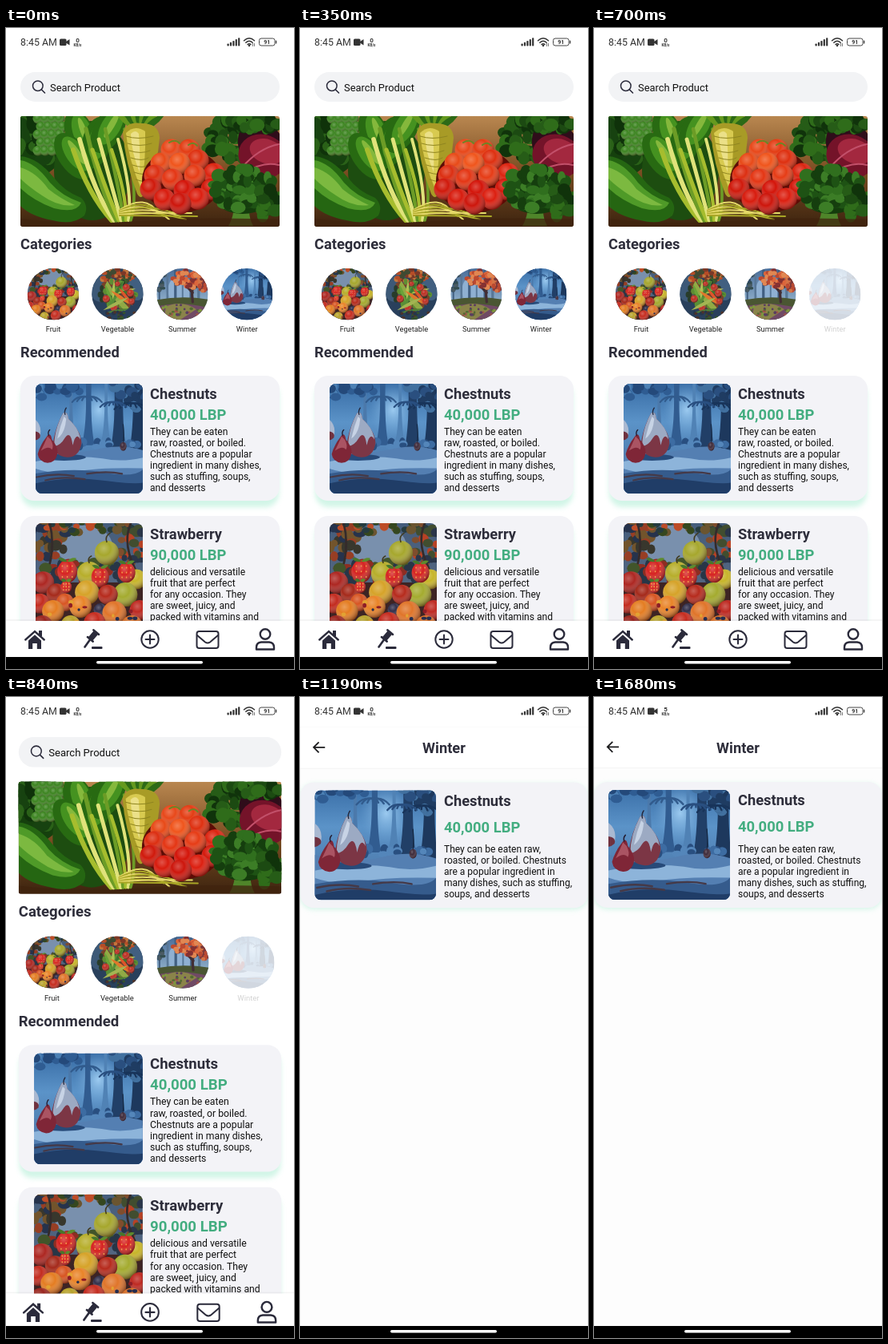
Animation of 360x800 px, one loop 1.75 s. Source, as an HTML page:

```html
<!DOCTYPE html>
<html lang="en">
<head>
<meta charset="utf-8">
<title>Grocery shop</title>
<style>
html, body { margin: 0; width: 100%; height: 100%; overflow: hidden; background: #fff; }
svg { display: block; width: 360px; height: 800px; font-family: Roboto, sans-serif; }
.head { font-size: 18.3px; font-weight: 700; fill: #2d2d3a; }
.price { font-size: 18.4px; font-weight: 700; fill: #43ad80; }
.body { font-size: 12.05px; fill: #111; }
.label { font-size: 9.3px; fill: #222; text-anchor: middle; }
.line { fill: none; stroke: #2b2b3b; stroke-width: 2; stroke-linecap: round; stroke-linejoin: round; }
</style>
</head>
<body>
<svg id="stage" viewBox="0 0 360 800"></svg>
<script>
const LOOP = 1750, STEP = 70;
const TAP = 590, OPEN = 767, OPEN_LEN = 583;
const INK = '#2b2b3b';

// ---- drawing helpers ----
let seed = 7;
const rnd = () => (seed = (seed * 16807) % 2147483647) / 2147483647;
const each = (list, fn) => list.map(fn).join('');
const times = (n, fn) => Array.from({ length: n }, (_, i) => fn(i)).join('');
const rect = (x, y, w, h, fill, r = 0, more = '') =>
  `<rect x="${x}" y="${y}" width="${w}" height="${h}" rx="${r}" fill="${fill}" ${more}/>`;
const oval = (x, y, rx, ry, fill, rot = 0) =>
  `<ellipse cx="${x}" cy="${y}" rx="${rx}" ry="${ry}" fill="${fill}" transform="rotate(${rot} ${x} ${y})"/>`;
const shape = (d, fill, more = '') => `<path d="${d}" fill="${fill}" ${more}/>`;
const stroke = (d, color, w, more = '') =>
  `<path d="${d}" fill="none" stroke="${color}" stroke-width="${w}" stroke-linecap="round" ${more}/>`;
const ball = (x, y, r, fill, ry = r, rot = 0) =>
  oval(x, y, r, ry, fill, rot) + oval(x, y, r, ry, 'url(#shade)', rot);
const text = (x, y, cls, s, more = '') => `<text x="${x}" y="${y}" class="${cls}" ${more}>${s}</text>`;
const lines = (x, y, list) => each(list, (s, i) => text(x, y + i * 14, 'body', s));
const leaf = (x, y, len, wide, rot, fill) =>
  shape(`M0 0Q${len / 2} ${-wide} ${len} 0Q${len / 2} ${wide} 0 0`, fill,
    `transform="translate(${x} ${y}) rotate(${rot})"`);
const cluster = (x, y, rx, ry, n, r, colors) => times(n, i => {
  const a = rnd() * 6.283, d = Math.sqrt(rnd());
  return oval(x + Math.cos(a) * d * rx, y + Math.sin(a) * d * ry,
    r * (0.6 + rnd() * 0.6), r * (0.6 + rnd() * 0.5), colors[i % colors.length]);
});
const gradient = (id, stops) =>
  `<linearGradient id="${id}" x2="0" y2="1">${each(stops, ([o, c]) => `<stop offset="${o}" stop-color="${c}"/>`)}</linearGradient>`;
const symbol = (id, art) =>
  `<symbol id="${id}" viewBox="0 0 100 100" preserveAspectRatio="xMidYMid slice">${art}</symbol>`;
let clips = 0;
const clipped = (x, y, w, h, r, art) => {
  const id = 'clip' + clips++;
  return `<clipPath id="${id}">${rect(x, y, w, h, '#000', r)}</clipPath><g clip-path="url(#${id})">${art}</g>`;
};
const pic = (id, x, y, w, h, r) =>
  clipped(x, y, w, h, r, `<use href="#${id}" x="${x}" y="${y}" width="${w}" height="${h}"/>`);

// ---- pictures ----
function winterArt() {
  const trunk = (x, w, c, base) =>
    shape(`M${x} 0L${x + w} 0Q${x + w - 1} 40 ${x + w + 3} ${base}L${x - 4} ${base}Q${x + 1} 40 ${x} 0`, c);
  const frond = (x, y, s, c) => times(7, i =>
    stroke(`M${x} ${y}q${(i - 3) * s * 0.6} ${-s * 0.4} ${(i - 3) * s} ${s * (0.5 + Math.abs(i - 3) * 0.18)}`, c, 1.6));
  return rect(0, 0, 100, 100, 'url(#wintersky)') + oval(59, 24, 22, 26, 'url(#glow)') +
    trunk(32, 3, '#4b79ab', 56) + trunk(47, 5, '#315c90', 56) + trunk(64, 3, '#5082b5', 57) +
    trunk(73, 8, '#213f67', 62) + trunk(90, 9, '#1d385d', 65) +
    cluster(16, 7, 26, 8, 26, 5, ['#2f5c92', '#24497a', '#4c80b4']) +
    cluster(86, 8, 19, 15, 30, 5, ['#1f3c62', '#2a4f7f', '#41709f']) +
    frond(48, 12, 4.5, '#315b8d') + frond(88, 18, 5, '#18345a') + frond(72, 17, 4, '#294f80') +
    cluster(50, 56, 50, 3, 26, 4, ['#3d6ca2', '#5486ba', '#294f80']) +
    shape('M0 58Q30 66 55 60T100 61V100H0Z', '#547fb2') +
    shape('M0 71Q34 64 62 68Q80 72 100 67V77Q60 76 38 80Q16 83 0 77Z', '#8db4da') +
    shape('M0 82Q35 76 64 81T100 77V100H0Z', '#355b8c') +
    shape('M0 91Q30 84 61 88T100 90V100H0Z', '#203d67') +
    stroke('M2 85Q20 81 36 84M10 88Q26 84 46 87M48 82Q66 79 80 82', '#453947', 1.6) +
    stroke('M81 37Q82 47 81 54', '#14263f', 0.8) + ball(81, 57, 3, '#3d2939', 4) +
    shape('M-3 30Q8 36 5 48Q2 52 -3 52Z', '#aab9d1') + shape('M-3 43Q7 43 5 49Q2 52 -3 52Z', '#70313f') +
    oval(27, 67, 20, 3, '#274a79') +
    shape('M26 27Q30 24 31 32Q43 44 43 54Q41 67 30 67Q18 66 17 54Q19 40 26 27Z', '#7c3645') +
    shape('M26 27Q30 24 31 32Q41 41 42 51Q38 43 35 56Q33 42 28 49Q24 56 18 57Q18 42 26 27Z', '#9caac3') +
    shape('M27 30Q23 40 21 50Q28 45 29 32Z', '#c7d3e5') +
    stroke('M28 28Q27 25 29 22', '#24283d', 1) +
    shape('M12 47Q15 44 16 51Q22 58 21 64Q19 72 12 72Q4 71 3 64Q5 56 12 47Z', '#7f2637') +
    shape('M12 48Q9 55 6 61Q13 56 16 60Q18 57 15 51Z', '#aa5463') +
    stroke('M13 47Q12 44 14 42', '#241d31', 1);
}

function fruitArt() {
  const berry = (x, y, r) => ball(x, y, r, '#d62320', r * 1.15) +
    times(9, i => oval(x + ((i % 3) - 1) * r * 0.5, y + (Math.floor(i / 3) - 1) * r * 0.55, 0.6, 0.8, '#f2a04b')) +
    leaf(x, y - r, r, 3, 200, '#47772a') + leaf(x, y - r, r, 3, -20, '#5d8b2d');
  const fruits = [[8, 54, 10, '#ad2722'], [93, 51, 9, '#c7b52a'], [66, 27, 11, '#a6a72d'], [50, 46, 11, '#b7ae2b'],
    [20, 64, 9, '#a52a1b'], [48, 63, 11, '#d6a329'], [83, 65, 11, '#a4ab2f'], [67, 65, 9, '#b62b1d'],
    [5, 73, 9, '#c32c20'], [28, 72, 8, '#d75522'], [17, 80, 10, '#e47d22'], [42, 76, 10, '#e98428'],
    [96, 79, 9, '#be2a22'], [60, 79, 6, '#32304b'], [73, 82, 11, '#e0752a'], [55, 91, 10, '#c62d20'],
    [33, 93, 9, '#b9a42d'], [89, 94, 10, '#d9712a'], [7, 94, 10, '#9b2720']];
  return rect(0, 0, 100, 100, 'url(#fruitsky)') +
    oval(45, 20, 26, 18, '#7990ad') +
    cluster(12, 18, 19, 26, 38, 5, ['#38372d', '#26334c', '#72542c', '#973e24']) +
    cluster(55, 4, 46, 6, 30, 4, ['#263b3f', '#6b5530', '#bd4c27', '#35471f']) +
    cluster(90, 21, 12, 24, 30, 4, ['#2a3549', '#7f4d2d', '#b84225', '#414d2f']) +
    stroke('M14 0Q20 24 10 50M88 0Q80 18 92 42', '#342b2b', 2) +
    rect(0, 54, 100, 46, '#3d2424') +
    cluster(50, 44, 45, 10, 40, 5, ['#41552a', '#8e2d22', '#283647']) +
    each(fruits.slice(0, 4), f => ball(...f)) +
    berry(30, 44, 9) + berry(60, 49, 8) + berry(84, 45, 8) +
    each(fruits.slice(4), f => ball(...f)) + berry(29, 58, 5) +
    cluster(50, 84, 47, 13, 12, 2, ['#262e4f', '#e2a332', '#8e1d26']) +
    stroke('M66 17Q64 12 69 9M50 36Q48 32 52 30', '#413b20', 1.2);
}

function vegArt() {
  return rect(0, 0, 100, 100, '#29405c') + oval(18, 35, 24, 30, '#3d5977') + oval(88, 30, 18, 32, '#415f80') +
    cluster(52, 14, 36, 14, 48, 5, ['#7c3827', '#b64d27', '#3f4a32', '#c2763d']) +
    cluster(50, 50, 34, 27, 60, 6, ['#38612b', '#5e8e33', '#283c2a', '#784129']) +
    shape('M30 24Q42 45 72 76L64 82Q37 55 25 35Z', '#91aa45') +
    shape('M63 25Q55 45 38 75L31 70Q42 45 54 22Z', '#588f38') +
    times(6, i => leaf(38 + i * 3, 64 - i * 4, 36, 6, -110 + i * 24, ['#6aa339', '#b0bf54', '#3d7530'][i % 3])) +
    leaf(37, 43, 48, 7, 35, '#e0772c') + leaf(52, 37, 45, 6, 52, '#df552a') +
    each([[67, 37, 7], [75, 48, 7], [28, 59, 7], [50, 30, 5], [77, 64, 6], [43, 76, 7]], ([x, y, r]) => ball(x, y, r, '#bd2e21')) +
    leaf(22, 81, 55, 7, -27, '#a3b552') + leaf(28, 86, 45, 5, -10, '#4f8136') +
    cluster(51, 91, 43, 8, 25, 4, ['#25364b', '#4c332b', '#35532d']);
}

function summerArt() {
  return rect(0, 0, 100, 100, 'url(#summersky)') + oval(46, 42, 24, 28, '#8fb0d2') +
    times(6, i => rect(4 + i * 15, 0, 3 + i % 3, 65, i % 2 ? '#587797' : '#415f82')) +
    shape('M0 61Q50 52 100 60V100H0Z', '#4a5632') + shape('M0 74Q45 62 100 76V100H0Z', '#704a65') +
    shape('M18 74Q48 60 77 79L45 100H15Z', '#8a844a') +
    stroke('M70 65Q66 38 76 13M70 47Q59 35 49 25M71 40Q81 33 90 27', '#422e34', 5) +
    cluster(65, 20, 33, 17, 72, 5, ['#bb4930', '#dc663b', '#853232', '#e18752']) +
    cluster(90, 32, 9, 13, 20, 5, ['#ba4a32', '#79383b', '#d47446']) +
    cluster(7, 19, 10, 26, 20, 5, ['#2f4961', '#4a5b64', '#344d50']) +
    cluster(50, 82, 43, 12, 30, 3, ['#516b32', '#9e5149', '#7e963d', '#5a3e60']);
}

function bannerArt() {
  const greens = ['#1c4a12', '#2f6c1a', '#10330b', '#265c17'];
  const reds = [[207, 152, '#e8481a'], [229, 152, '#e33d14'], [194, 169, '#e84a18'], [240, 165, '#de3010'],
    [217, 169, '#f0551c'], [260, 182, '#dc2410'], [186, 184, '#dc2f12'], [236, 184, '#e63c16'],
    [181, 201, '#d01a0c'], [208, 189, '#e43614'], [223, 203, '#d4150a'], [257, 201, '#d4190c'],
    [198, 214, '#d81c0e'], [240, 213, '#dc1f10'], [218, 219, '#cd160c']];
  return rect(18, 110, 324, 138, 'url(#wood)') +
    oval(40, 140, 34, 44, '#15400d') + oval(108, 178, 48, 62, '#1d4d10') +
    cluster(38, 136, 30, 34, 42, 10, ['#174210', '#2a6118', '#0f320a']) +
    times(20, i => ball(40 + (i % 4) * 9 + (i >> 2) % 2 * 4, 113 + (i >> 2) * 10, 6.5, '#3c8420')) +
    each([[93, 134, -20], [113, 143, 14], [128, 126, 30], [84, 160, -35]], ([x, y, r]) =>
      oval(x, y, 18, 33, '#286a12', r) + oval(x + 3, y - 3, 12, 25, '#459220', r) +
      oval(x + 4, y - 5, 4, 18, '#85b83c', r)) +
    times(9, i => stroke(`M${132 + i * 3} 240Q${103 + i * 8} 208 ${84 + i * 8} ${152 - i % 3 * 13}`,
      ['#a6bd2e', '#e0e37a', '#6c9c26'][i % 3], 6 - i * 0.3)) +
    times(8, i => leaf(168, 130, 40, 8, -142 + i * 15, i % 2 ? '#2d6a17' : '#65991f')) +
    shape('M146 130Q151 116 170 119Q191 119 192 137Q190 170 174 205Q169 216 164 207Q149 169 146 130Z', '#a89b26') +
    shape('M150 131Q161 120 174 129Q175 165 169 201Q153 164 150 131Z', '#d8ca50') +
    shape('M156 132Q162 126 166 132Q168 160 167 180Q157 156 156 132Z', '#ebe088') +
    times(7, i => stroke(`M${150 + i * 2} ${135 + i * 9}q15 5 ${34 - i * 4} 0`, '#8f8520', 1)) +
    times(8, i => stroke(`M142 ${227 + i}Q175 ${206 + i * 4} ${190 + i * 7} ${231 + i % 3 * 4}`, i % 2 ? '#a9a626' : '#e4d868', 2)) +
    shape('M18 160Q40 162 60 187Q73 204 94 212Q104 222 98 234Q83 247 58 240Q31 235 18 222Z', '#256612') +
    shape('M18 165Q37 168 55 193Q70 210 94 218Q88 232 60 225Q35 216 18 200Z', '#4f9a28') +
    shape('M18 174Q38 180 53 201Q68 213 86 221Q66 224 45 209Q28 198 18 188Z', '#7cb940') +
    cluster(282, 137, 32, 27, 62, 9, greens) +
    oval(320, 150, 28, 38, '#2f0d1a', -25) + oval(321, 160, 31, 27, '#741329', 20) +
    oval(326, 154, 22, 15, '#a3283f', 20) + stroke('M295 174Q316 150 341 145M299 181Q320 166 341 171', '#c2506a', 2) +
    cluster(316, 119, 26, 10, 28, 9, greens) +
    oval(220, 190, 50, 40, '#5c0c06') + each(reds, ([x, y, c]) => ball(x, y, 13.5, c)) +
    stroke('M204 143q8 -5 13 1M228 146q6 -5 11 1', '#6c8526', 2) +
    shape('M283 209Q288 230 278 247H309Q299 229 309 206Z', '#4f852a') +
    oval(296, 206, 38, 26, '#143c0c') +
    cluster(295, 200, 38, 25, 90, 8, ['#1e5214', '#306f1e', '#153e0e', '#3c7d26']) +
    cluster(328, 218, 17, 18, 25, 8, greens) +
    shape('M18 238Q90 247 170 241T342 239V248H18Z', '#40230e', 'opacity=".75"');
}

// ---- screens ----
const card = (x, y, w, h) =>
  rect(x + 1, y + 8, w - 2, h, '#b9f0da', 17, 'filter="url(#soft)" opacity=".65"') + rect(x, y, w, h, '#f3f3f7', 17);

function tabBar() {
  const bold = 'style="stroke-width:2.4"';
  return rect(0, 738, 360, 2, '#000', 0, 'opacity=".04"') + rect(0, 740, 360, 46, '#fff') +
    stroke('M24.300 763.500L36 753L47.700 763.500', INK, 2.4) + rect(41, 752, 4, 7, INK) +
    shape('M28 764.500L36 757.300L44 764.500V775H38.800V768H33.200V775H28Z', INK) +
    `<g transform="translate(109 758.5) rotate(40)">${rect(-3.5, -5, 7, 10, INK)}${rect(-5.500, -7, 11, 2.6, INK, 1)}${rect(-5.500, 4.400, 11, 2.6, INK, 1)}</g>` +
    stroke('M106 762L98.500 772.500', INK, 2.6) + rect(107, 772, 13.5, 3, INK, 1) +
    '<circle cx="180" cy="763" r="10.7" class="line"/><path d="M174.5 763h11M180 757.5v11" class="line"/>' +
    '<rect x="238.5" y="753" width="27" height="21" rx="3" class="line"/><path d="M239 758L249 766.5Q252 768.5 255 766.5L265 758" class="line"/>' +
    `<circle cx="324" cy="756.5" r="6.3" class="line" ${bold}/>` +
    `<path d="M319 766.5H329Q335 767 335 773V775.5H313V773Q313 767 319 766.5Z" class="line" ${bold}/>`;
}

function home() {
  const cat = (id, name, x) => `<g id="cat-${id}">${pic(id, x - 32.3, 300, 64.5, 64.5, 32.25)}${text(x, 379, 'label', name)}</g>`;
  return rect(0, 37, 360, 749, '#fff') + rect(18, 55, 324, 37, '#f2f3f5', 18.5) +
    '<circle cx="39.8" cy="72.2" r="6.3" class="line" style="stroke-width:1.5"/><path d="M44.5 77L48.5 81" class="line" style="stroke-width:1.6"/>' +
    text(55, 78.5, 'body', 'Search Product', 'style="font-size:12.9px"') +
    clipped(18, 110, 324, 138, 3, bannerArt()) +
    text(18, 276.3, 'head', 'Categories') +
    cat('fruit', 'Fruit', 59) + cat('veg', 'Vegetable', 139.5) + cat('summer', 'Summer', 220.5) + cat('winter', 'Winter', 301.2) +
    text(18, 411, 'head', 'Recommended') +
    card(18, 434, 324, 156) + pic('winter', 37, 444, 134, 137, 8) +
    text(180, 463.3, 'head', 'Chestnuts') + text(180, 489.3, 'price', '40,000 LBP') +
    lines(180, 508, ['They can be eaten', 'raw, roasted, or boiled.', 'Chestnuts are a popular', 'ingredient in many dishes,', 'such as stuffing, soups,', 'and desserts']) +
    card(18, 609, 324, 156) + pic('fruit', 37, 618, 134, 137, 8) +
    text(180, 637.7, 'head', 'Strawberry') + text(180, 663.5, 'price', '90,000 LBP') +
    lines(180, 682.5, ['delicious and versatile', 'fruit that are perfect', 'for any occasion. They', 'are sweet, juicy, and', 'packed with vitamins and']) +
    tabBar();
}

function detail() {
  return rect(0, 37, 360, 749, '#fdfdfd') + rect(0, 88, 360, 1.2, '#f4f4f4') + rect(0, 37, 360, 51, '#fff') +
    '<path d="M31 62.3H17.5M23.300 55.800L16.800 62.300L23.300 68.800" class="line" style="stroke:#1c1c1e;stroke-width:1.8;stroke-linecap:butt;stroke-linejoin:miter"/>' +
    text(180, 69.7, 'head', 'Winter', 'text-anchor="middle"') +
    rect(0, 108, 360, 157, '#b9f0da', 17, 'filter="url(#soft)" opacity=".6"') + rect(0, 106, 360, 157, '#f3f3f7', 17) +
    pic('winter', 18, 116, 152, 137, 8) +
    text(180, 135.3, 'head', 'Chestnuts') + text(180, 168.3, 'price', '40,000 LBP') +
    lines(180, 194, ['They can be eaten raw,', 'roasted, or boiled. Chestnuts', 'are a popular ingredient in', 'many dishes, such as stuffing,', 'soups, and desserts']);
}

function systemBars() {
  const small = (x, y, size, id, s) =>
    `<text id="${id}" x="${x}" y="${y}" font-size="${size}" font-weight="700" text-anchor="middle" fill="#333">${s}</text>`;
  return rect(0, 0, 360, 37, '#fff') + text(18, 22.3, 'body', '8:45 AM', 'style="font-size:12.4px;fill:#333"') +
    rect(67, 13.5, 8.5, 8.5, '#333', 1.5) + shape('M75 17L79.5 14V21.5L75 18.5Z', '#333') +
    small(89.5, 17.8, 8, 'rate', '0') + small(89.5, 23, 4.6, 'unit', 'KB/s') +
    times(5, i => rect(276.5 + i * 3.4, 19.5 - i * 1.8, 2.2, 3 + i * 1.8, '#333', 0.8)) +
    stroke('M297.5 15.8Q304 9.8 310.5 15.8M299.8 18.3Q304 14.3 308.2 18.3M302 20.6Q304 18.8 306 20.6', '#333', 1.5) +
    '<circle cx="304" cy="22" r="1.2" fill="#333"/>' + stroke('M308.5 22.5V19.5M310.5 19.5V22.5', '#555', 0.8) +
    rect(316.5, 13, 19.5, 9, 'none', 2.5, 'stroke="#444" stroke-width="1"') + rect(337, 15.5, 1.3, 4, '#444', 0.6) +
    small(326.2, 20.2, 7, 'charge', '91') +
    rect(0, 785, 360, 15, '#000') + rect(113, 790, 133, 3.4, '#fff', 1.7);
}

const stage = document.getElementById('stage');
stage.innerHTML = `<defs>
  <radialGradient id="shade" cx=".38" cy=".32" r=".72"><stop offset="0" stop-color="#fff" stop-opacity=".25"/>
    <stop offset=".4" stop-color="#fff" stop-opacity="0"/><stop offset="1" stop-color="#200" stop-opacity=".55"/></radialGradient>
  <radialGradient id="glow"><stop offset="0" stop-color="#9bcaf0"/><stop offset="1" stop-color="#6ea4d5" stop-opacity="0"/></radialGradient>
  ${gradient('wintersky', [[0, '#376ba4'], [0.35, '#5b93c8'], [0.6, '#5283b6']])}
  ${gradient('fruitsky', [[0, '#455d7c'], [0.5, '#526580']])}
  ${gradient('summersky', [[0, '#486c99'], [0.6, '#88a8c5']])}
  ${gradient('wood', [[0, '#b98750'], [0.5, '#7a4d22'], [1, '#3c230f']])}
  <filter id="soft" x="-10%" y="-20%" width="120%" height="140%"><feGaussianBlur stdDeviation="3"/></filter>
  ${symbol('winter', winterArt())}${symbol('fruit', fruitArt())}${symbol('veg', vegArt())}${symbol('summer', summerArt())}
  </defs>
  ${rect(0, 0, 360, 800, '#f2f2f2')}
  ${clipped(0, 37, 360, 748, 0, `<g id="home">${home()}</g><g id="detail">${detail()}</g>`)}
  ${systemBars()}`;

// ---- motion ----
const clamp = v => Math.max(0, Math.min(1, v));
const cubic = (a, b, c, d, s) => {
  const q = 1 - s;
  return a * q * q * q + 3 * b * q * q * s + 3 * c * q * s * s + d * s * s * s;
};
// Quick start with a very long settle, made of two joined curves
function ease(x) {
  const [xs, ys] = x < 1 / 6
    ? [[0, 0.05, 0.1333, 1 / 6], [0, 0, 0.06, 0.4]]
    : [[1 / 6, 0.2083, 0.25, 1], [0.4, 0.82, 1, 1]];
  let lo = 0, hi = 1;
  for (let i = 0; i < 24; i++) {
    const mid = (lo + hi) / 2;
    if (cubic(...xs, mid) < x) lo = mid; else hi = mid;
  }
  return cubic(...ys, lo);
}

const get = id => document.getElementById(id);
const homeEl = get('home'), detailEl = get('detail'), tapped = get('cat-winter'), rate = get('rate');
const zoom = (el, s) => el.setAttribute('transform', `translate(180 411) scale(${s}) translate(-180 -411)`);
const fade = (el, o) => {
  el.setAttribute('opacity', o);
  el.setAttribute('visibility', o > 0 ? 'visible' : 'hidden');
};

function render(ms) {
  const t = Math.floor((ms % LOOP + 0.5) / STEP) * STEP;
  const x = clamp((t - OPEN) / OPEN_LEN), p = ease(x);
  fade(tapped, 1 - 0.8 * clamp((t - TAP) / 110));
  zoom(homeEl, 1 + 0.085 * p);
  fade(homeEl, clamp(1 - (x - 0.126) / 0.28));
  zoom(detailEl, 0.85 + 0.15 * p);
  fade(detailEl, clamp((x - 0.126) / 0.125));
  rate.textContent = t < 1400 ? '0' : '5';
}

const start = performance.now();
function tick() {
  render(performance.now() - start);
  requestAnimationFrame(tick);
}
tick();
</script>
</body>
</html>
```
